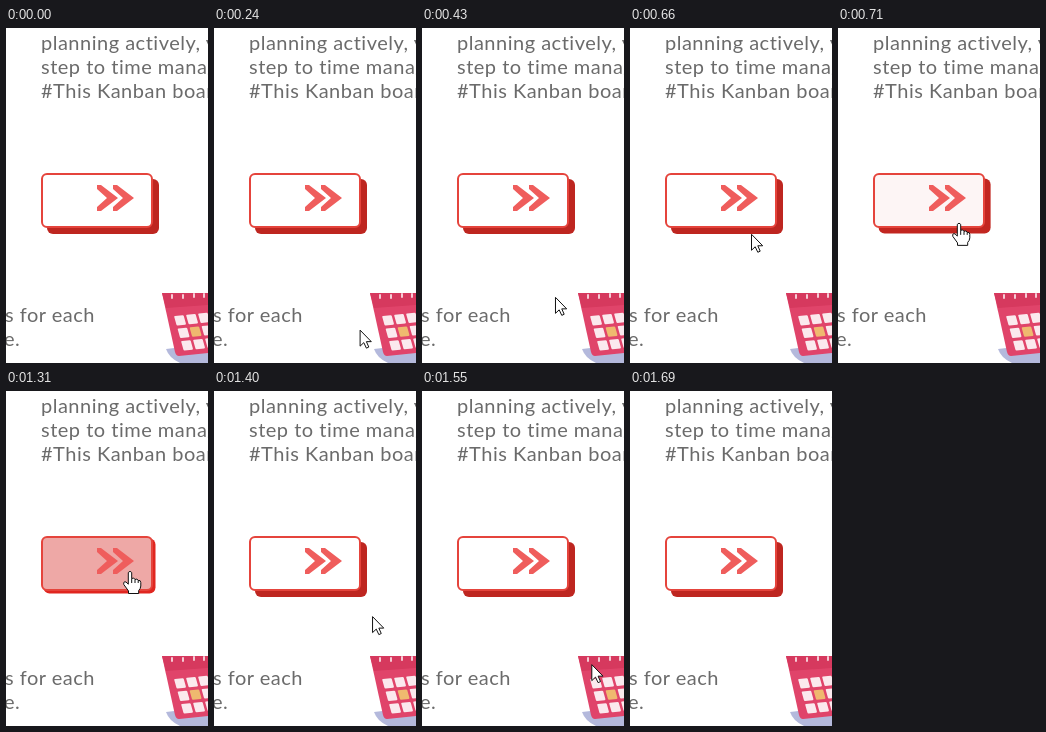
An HTML page for the animation above (2010 ms loop, 202 by 335 pixels).

```html
<!DOCTYPE html>
<html lang="en">
<head>
<meta charset="utf-8">
<title>Hover button</title>
<style>
  html, body { margin: 0; width: 100%; height: 100%; overflow: hidden; background: #fff; }
  svg { display: block; width: 202px; height: 335px; overflow: hidden; }
  text { font: 400 20px Lato, "Open Sans", sans-serif; letter-spacing: .5px; fill: #6b6b6b; white-space: pre; }
</style>
</head>
<body>
<svg viewBox="0 0 202 335">
  <text x="35" y="22">planning actively, you</text>
  <text x="35" y="46">step to time manage</text>
  <text x="35" y="70">#This Kanban board</text>
  <text x="-1" y="294">s for each</text>
  <text x="-2" y="318">e.</text>

  <g id="calendar">
    <path d="M160 321L202 316V335H174Q163 330 160 321Z" fill="#b4b9dc"/>
    <path d="M156 265H202V325L173 328Q170 328 169 324Z" fill="#e0446a"/>
    <path d="M156 265H202V277L160 280Z" fill="#d6395e"/>
    <g id="cells" transform="matrix(1 -.1 .28 1 168 288)" fill="#fbe9ee"></g>
    <g fill="none" stroke="#f6cbd5" stroke-width="2" stroke-linecap="round">
      <path d="M166 267v3M177 267v3M188 266v3M198 266v3"/>
    </g>
  </g>

  <rect id="shadow" x="35" y="145" width="112" height="55" rx="6"/>
  <rect id="face" x="36" y="146" width="110" height="53" rx="5" stroke="#e5443c" stroke-width="2"/>
  <g fill="#ef5d5c">
    <path id="chevron" d="M91 157h4l17 13l-17 13h-4v-4l10-9l-10-9Z"/>
    <use href="#chevron" x="16"/>
  </g>

  <g id="cursor" fill="#fff" stroke="#111" stroke-linejoin="round">
    <path id="arrow" d="M.5 .5V16.5L4.2 13L6.8 18.5L9.2 17.4L6.8 12H11.7Z"/>
    <g id="hand">
      <path d="M-1.7 1.5Q0-1 1.7 1.5V7.5Q4 6 5 8.5Q7.3 7 8.2 9.5Q10.6 8.7 10.8 11.5V15Q10.5 18 8.7 19.5V22.5H-1.5V20L-6.2 13.5Q-6.8 10 -4 11L-1.7 13.2Z"/>
      <path d="M1.7 7.5V12M5 8.5V12M8.2 9.5V12" fill="none"/>
    </g>
  </g>
</svg>
<script>
const LOOP = 2010;
const $ = id => document.getElementById(id);

// Pointer tip: time, x, y
const path = [
  [100, 155, 326], [430, 133, 269], [470, 132, 263], [610, 122, 217],
  [660, 121, 206], [710, 121, 195], [850, 121, 176], [1310, 121, 176],
  [1310, 124, 180], [1370, 124, 180], [1400, 158, 225], [1460, 161, 232],
  [1690, 182, 336]
];

const clamp = v => Math.max(0, Math.min(1, v));
const mix = (a, b, k) => a + (b - a) * k;
const blend = (a, b, k) => `rgb(${a.map((v, i) => Math.round(mix(v, b[i], k)))})`;

function pointerAt(t) {
  const i = path.findIndex(p => p[0] > t);
  if (i < 1) return null;
  const [a, b] = [path[i - 1], path[i]];
  const k = (t - a[0]) / (b[0] - a[0]);
  return [mix(a[1], b[1], k), mix(a[2], b[2], k)];
}

for (let row = 0; row < 3; row++) {
  for (let col = 0; col < 3; col++) {
    const cell = document.createElementNS("http://www.w3.org/2000/svg", "rect");
    const attrs = { x: col * 12, y: row * 12.5, width: 9.5, height: 9.5, rx: 1 };
    if (row === 1 && col === 1) attrs.fill = "#efb96f";
    for (const key in attrs) cell.setAttribute(key, attrs[key]);
    $("cells").append(cell);
  }
}

function draw() {
  const t = performance.now() % LOOP;
  const hover = clamp((t - 700) / 100) * (1 - clamp((t - 1370) / 30));
  const offset = mix(6, 2.5, hover);
  $("shadow").setAttribute("transform", `translate(${offset} ${offset})`);
  $("shadow").setAttribute("fill", blend([190, 38, 32], [224, 38, 32], hover));
  $("face").setAttribute("fill", blend([255, 255, 255], [238, 168, 166], hover));

  const tip = pointerAt(t);
  const pointing = t >= 710 && t < 1380;
  $("cursor").style.display = tip ? "" : "none";
  $("arrow").style.display = pointing ? "none" : "";
  $("hand").style.display = pointing ? "" : "none";
  if (tip) $("cursor").setAttribute("transform", `translate(${tip})`);
  requestAnimationFrame(draw);
}
draw();
</script>
</body>
</html>
```
